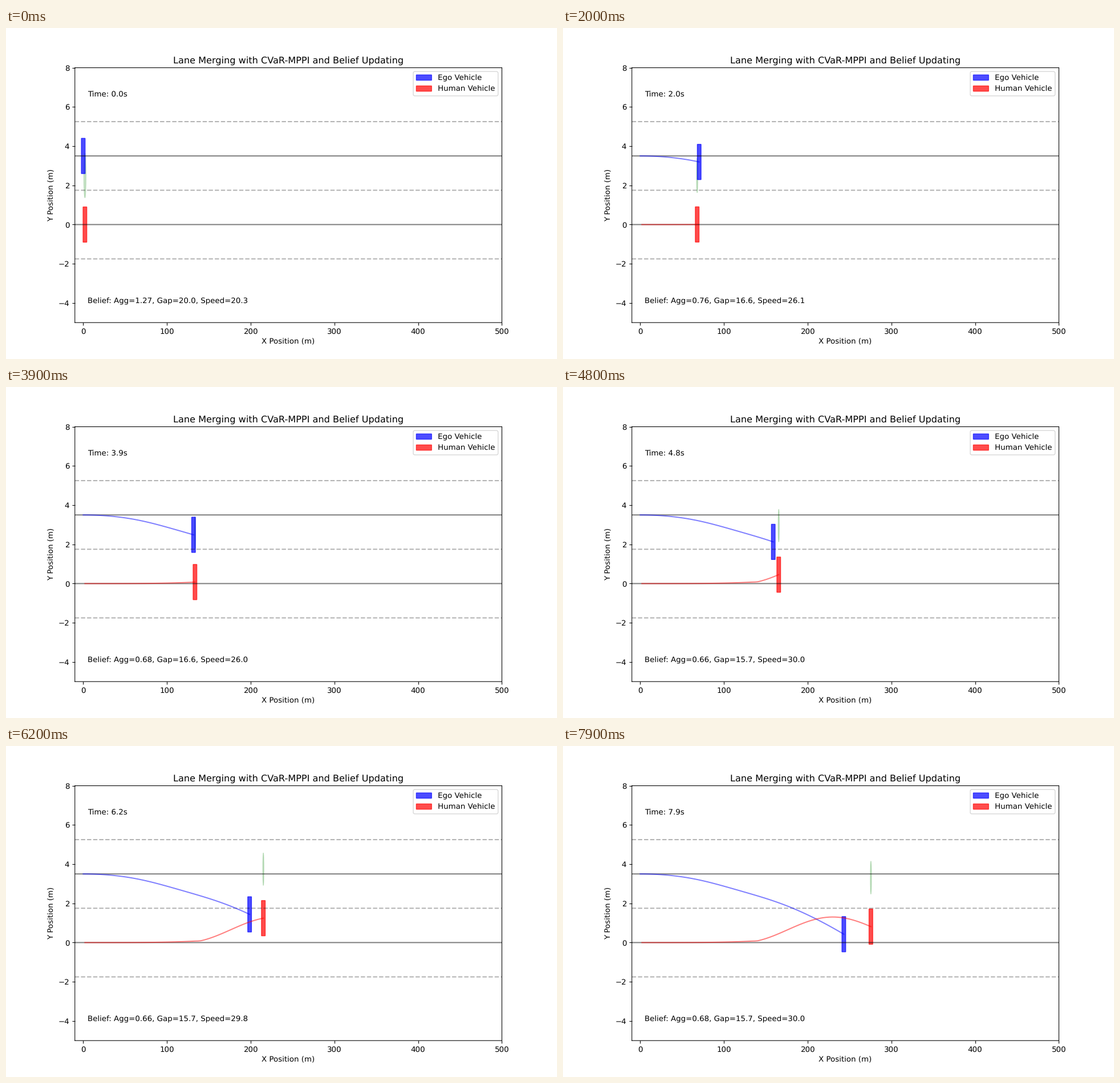
Recreate the animation shown at these times as a matplotlib script. Size 966x580 px, loop 8 s.

```python
import numpy as np
import matplotlib.pyplot as plt
from matplotlib.animation import FuncAnimation
from matplotlib.patches import Ellipse, Rectangle

FRAMES, STEP = 80, 0.1
CAR_L, CAR_W = 4.5, 1.8
LANE_W = 3.5
SWERVE = 4.2  # moment the human driver reacts to the merge

plt.rcParams.update({"font.family": "DejaVu Sans", "text.hinting": "none", "path.snap": False})


def bell(x, centre, width):
    return np.exp(-((x - centre) / width) ** 2)


t = np.arange(FRAMES) * STEP
after = t >= SWERVE

# Ego car: steady braking while it drifts down into the lower lane
ego_x = 36.7 * t - 0.75 * t**2
ego_y = LANE_W - 5.2e-5 * ego_x**2 - 0.12 * bell(ego_x, 118, 50)

# Human car: speeds up a little, then swerves out and back in a cosine arc
human_x = 2 + 33 * t + 2.5 * np.maximum(t - 2.8, 0)
drift = 0.08 * np.minimum(human_x / 135, 1) ** 4
arc = 1.304 * np.cos(np.pi * (np.maximum(human_x, 122) - 230) / 216) ** 2
human_y = np.maximum(drift, arc)

# Belief: quick settling at first, then a jump when the human reacts
agg = np.maximum(0.812 - 0.033 * t + 0.458 * np.exp(-1.856 * t), 0.66)
agg += 0.02 * np.clip(t - 6.2, 0, 1)
gap = 16.6 - 0.9 * after + 3.4 * np.exp(-t / 0.45)
speed = 26 + 4 * after - (5.7 - 10 * t) * np.exp(-2.8 * t) - 0.2 * bell(t, 6.2, 0.5)

fig, ax = plt.subplots(figsize=(10, 6.0042), dpi=96.6)
ax.set(xlim=(-10, 500), ylim=(-5, 8), xlabel="X Position (m)", ylabel="Y Position (m)",
       title="Lane Merging with CVaR-MPPI and Belief Updating")

for y in (0, LANE_W):
    ax.axhline(y, color="black", alpha=0.5)
for y in (-LANE_W / 2, LANE_W / 2, 1.5 * LANE_W):
    ax.axhline(y, color="black", ls="--", alpha=0.3)


def add_car(color, label):
    car = ax.add_patch(Rectangle((0, 0), CAR_L, CAR_W, color=color, alpha=0.7, label=label))
    track, = ax.plot([], [], color=color, alpha=0.5)
    return car, track


cloud = ax.add_patch(Ellipse((0, 0), 1, 1, color="green", alpha=0.2))
ego = add_car("blue", "Ego Vehicle")
human = add_car("red", "Human Vehicle")
clock = ax.text(5, 6.5, "")
belief = ax.text(5, -4, "")
ax.legend(loc="upper right")


def place(vehicle, xs, ys, i):
    car, track = vehicle
    car.set_xy((xs[i] - CAR_L / 2, ys[i] - CAR_W / 2))
    track.set_data(xs[:i + 1], ys[:i + 1])


def update(i):
    place(ego, ego_x, ego_y, i)
    place(human, human_x, human_y, i)
    cloud.set_center((human_x[i], human_y[i] + 2.5))
    cloud.set_width(2 * agg[i])
    cloud.set_height(1 + agg[i])
    clock.set_text(f"Time: {t[i]:.1f}s")
    belief.set_text(f"Belief: Agg={agg[i]:.2f}, Gap={gap[i]:.1f}, Speed={speed[i]:.1f}")
    return [*ego, *human, cloud, clock, belief]


anim = FuncAnimation(fig, update, frames=FRAMES, interval=100, repeat=True, repeat_delay=0)
plt.show()
```
